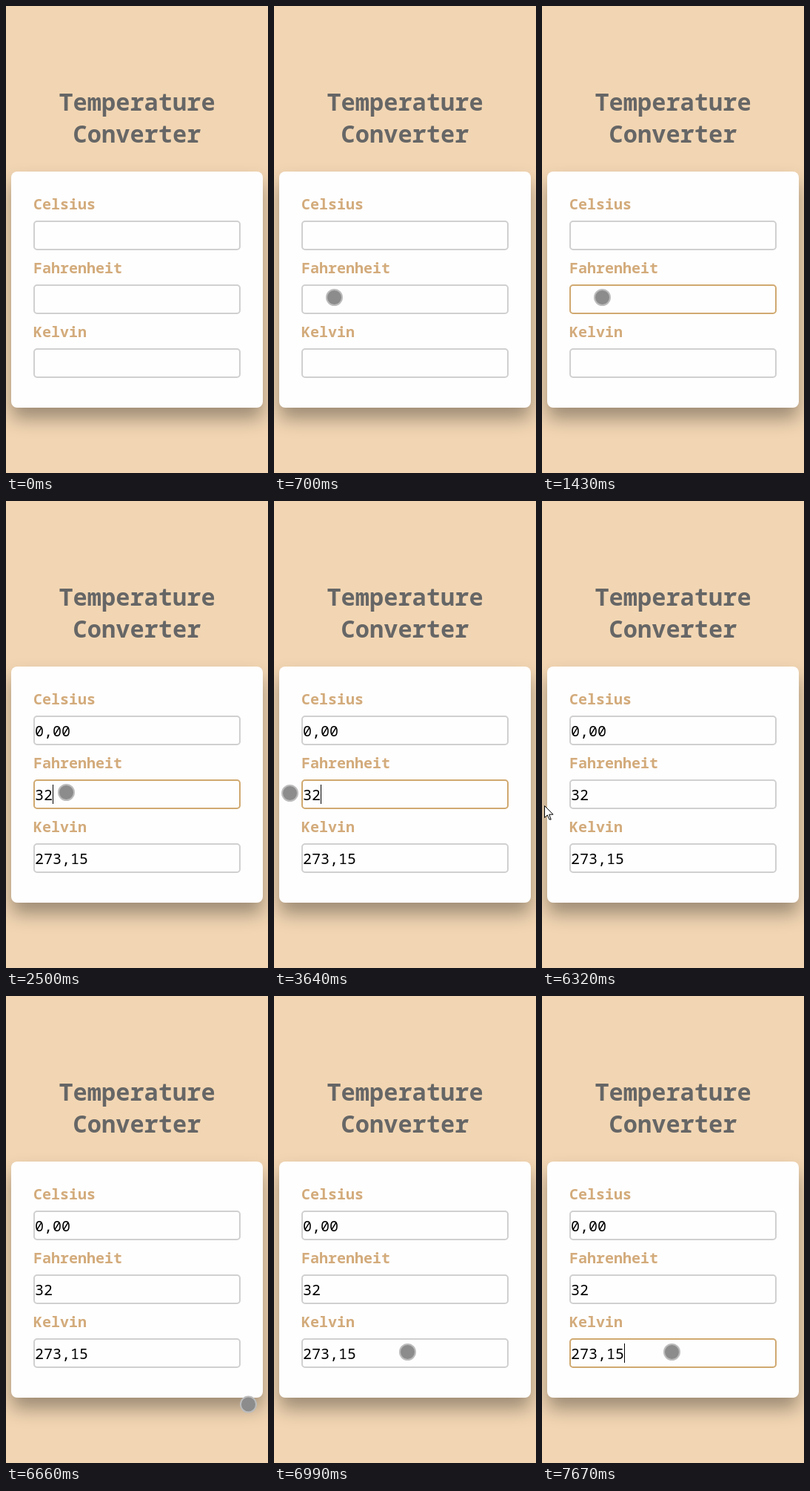
An HTML page for the animation above (8000 ms loop, 354 by 629 pixels).

```html
<!DOCTYPE html>
<html lang="en">
<head>
<meta charset="utf-8">
<title>Temperature Converter</title>
<style>
  html, body { margin: 0; height: 100%; overflow: hidden; background: #f2d6b3; }
  .card {
    position: absolute; left: 7px; top: 223px; width: 340px; height: 318px;
    border-radius: 8px; background: #fefefe; box-shadow: 0 15px 25px rgba(0, 0, 0, .35);
  }
  svg { position: absolute; left: 0; top: 0; }
  text { font: 20px "Roboto Mono", "Noto Sans Mono", "DejaVu Sans Mono", monospace; }
  .title { font-size: 32px; font-weight: 700; fill: #666; text-anchor: middle; }
  .label { font-weight: 700; fill: #d3ab7b; }
  .box { fill: none; stroke: #d0d0d0; stroke-width: 2; }
</style>
</head>
<body>
<div class="card"></div>
<svg width="354" height="629" viewBox="0 0 354 629">
  <text class="title" x="177" y="141">Temperature</text>
  <text class="title" x="177" y="184">Converter</text>
  <g id="fields"></g>
  <rect id="caret" width="1" height="26"/>
  <circle id="touch" r="10.5" fill="#8c8c8c" stroke="#bcbcbc" stroke-width="2"/>
  <path id="arrow" d="M.5 .5V16.5L4.3 13L7 19H9.2L6.7 12.2H12Z" fill="#fff" stroke="#000"/>
</svg>
<script>
const LOOP = 8000;
const $ = id => document.getElementById(id);

$("fields").innerHTML = ["Celsius", "Fahrenheit", "Kelvin"].map((name, i) => `
  <g transform="translate(37 ${289 + 86 * i})">
    <text class="label" y="-15">${name}</text>
    <rect class="box" x="1" y="1" width="278" height="38" rx="4"/>
    <text class="value" x="2" y="28"></text>
  </g>`).join("");
const boxes = document.querySelectorAll(".box");
const values = document.querySelectorAll(".value");

// Every track lists [start time, ...state]; a state holds until the next one.
const entries = [
  [0, "", "", ""],
  [2230, "-16,11", "3", "257,04"],
  [2500, "0,00", "32", "273,15"]
];
// field index, border colour
const focus = [
  [0, -1], [840, 1, "#d2bea6"], [970, 1, "#d0a970"], [5050, -1],
  [7540, 2, "#d2bea6"], [7670, 2, "#d0a970"]
];
const blinks = [
  [0, 0], [970, 1], [1430, 0], [1970, 1], [3040, 0], [3500, 1],
  [4050, 0], [4520, 1], [5050, 0], [7540, 1]
];
// pointer kind, x, y
const pointer = [
  [0, ""],
  [500, "arrow", 8, 388], [570, "touch", 52, 391.5], [630, "touch", 75, 392],
  [700, "touch", 81.5, 392.5], [3640, "touch", 21.5, 393.5], [3710, ""],
  [6320, "arrow", 3, 410], [6390, "touch", 75, 500], [6450, "touch", 165, 557],
  [6520, "touch", 250, 582.5], [6590, "touch", 315, 575], [6650, "touch", 327.5, 550],
  [6720, "touch", 290, 520], [6790, "touch", 245, 500], [6850, "touch", 215, 488],
  [6920, "touch", 192, 482], [6990, "touch", 180.5, 479.5], [7060, "touch", 178.5, 479.5],
  [7140, "touch", 177.5, 479.5], [7210, "touch", 176.5, 479.5], [7340, "touch", 175.5, 479.5]
];

const at = (track, t) => track.findLast(step => step[0] <= t).slice(1);
const show = (id, on) => $(id).style.display = on ? "" : "none";
const move = (id, x, y) => $(id).setAttribute("transform", `translate(${x} ${y})`);

function draw(t) {
  const texts = at(entries, t);
  const [field, colour] = at(focus, t);
  const [kind, x, y] = at(pointer, t);

  values.forEach((el, i) => el.textContent = texts[i]);
  boxes.forEach((el, i) => el.style.stroke = i === field ? colour : "");

  const caretOn = field >= 0 && at(blinks, t)[0];
  show("caret", caretOn);
  if (caretOn) move("caret", 39 + 12 * texts[field].length, 296 + 86 * field);

  for (const id of ["touch", "arrow"]) show(id, id === kind);
  if (kind) move(kind, x, y);
}

const start = performance.now();
function frame() {
  draw((performance.now() - start) % LOOP);
  requestAnimationFrame(frame);
}
frame();
</script>
</body>
</html>
```
